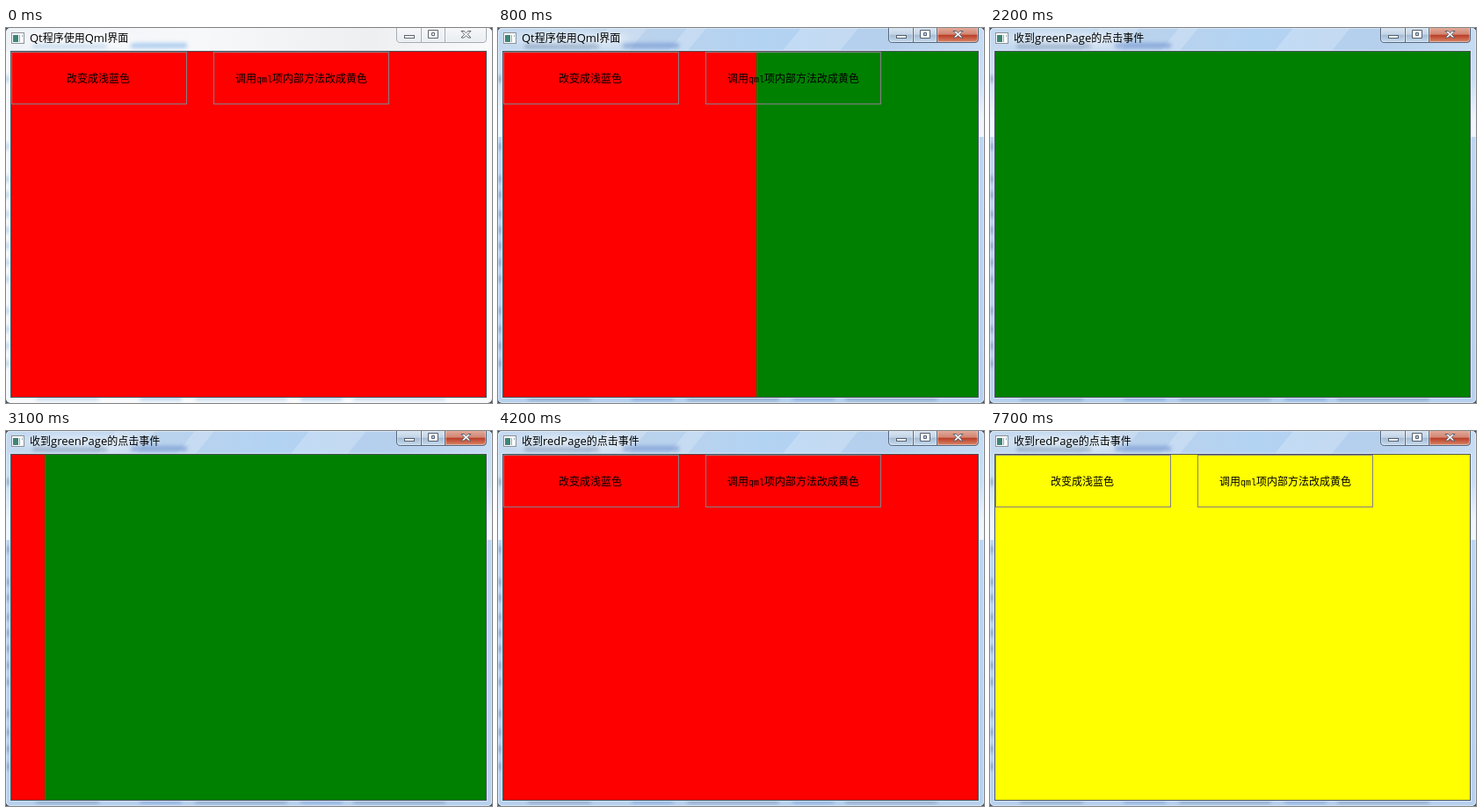
Animation, 553 px wide and 427 px high, one loop 8 s. Source, as an HTML page:

```html
<!DOCTYPE html>
<html lang="zh-CN">
<head>
<meta charset="utf-8">
<style>
html, body { margin: 0; width: 100%; height: 100%; overflow: hidden; background: #46525f; }
svg { display: block; width: 553px; height: 427px; }
text { font: 12px "Noto Sans CJK SC", "Noto Sans CJK", "Noto Sans CJK JP", sans-serif; fill: #000; white-space: pre; }
.title tspan.latin { font: 13px "Open Sans", "Noto Sans", sans-serif; }
.button tspan.latin { font: 10px "Liberation Mono", monospace; }
.button rect { fill: none; stroke: #858085; }
</style>
</head>
<body>
<svg viewBox="0 0 553 427">
  <defs>
    <filter id="soft" x="-50%" y="-200%" width="200%" height="500%"><feGaussianBlur stdDeviation="2.2"/></filter>
    <filter id="glow" x="-20%" y="-100%" width="140%" height="300%"><feGaussianBlur stdDeviation="5"/></filter>
    <clipPath id="window"><rect width="553" height="427" rx="5"/></clipPath>
    <clipPath id="client"><rect x="6" y="27" width="540" height="393"/></clipPath>
  </defs>
  <g clip-path="url(#window)">
    <g id="idle"></g>
    <g id="active"></g>
    <ellipse cx="85" cy="12" rx="66" ry="7" fill="#fff" opacity=".5" filter="url(#glow)"/>
    <g id="icon" shape-rendering="crispEdges">
      <rect x="6.5" y="5.5" width="14" height="12" fill="#fff" stroke="#8b9298"/>
      <rect x="8" y="8" width="6" height="8" fill="#3d8577"/>
      <path d="M15.5 8v8M18.5 8v2" stroke="#8fa8b4"/>
    </g>
    <text id="title" class="title" x="27" y="16"></text>
    <rect x="5.5" y="26.5" width="541" height="394" fill="none" stroke="#4b5661"/>
    <g clip-path="url(#client)">
      <rect id="page" x="6" y="27" width="540" height="393"/>
      <rect id="green" y="27" width="540" height="393" fill="#008000"/>
      <g id="buttons"></g>
    </g>
  </g>
</svg>
<script>
const $ = id => document.getElementById(id);
const LOOP = 8000, LEFT = 6, WIDTH = 540, SLIDE = 500;
const PUSH = { from: 700, start: 566.5, end: 1100 };
const POP = { from: 3100, start: 3065, end: 3600 };
const TITLES = [[0, 'Qt程序使用Qml界面'], [2200, '收到greenPage的点击事件'], [4200, '收到redPage的点击事件']];
const PAGES = [[0, '#ff0000'], [5600, '#add8e6'], [7700, '#ffff00']];

const mixed = s => s.replace(/[A-Za-z]+/g, '<tspan class="latin">$&</tspan>');
const at = (steps, t) => steps.filter(([from]) => t >= from).pop()[1];

function gradient(id, stops, vertical) {
  const list = stops.map(([o, c]) => `<stop offset="${o}" stop-color="${c}"/>`).join('');
  return `<linearGradient id="${id}" x2="${vertical ? 0 : 1}" y2="${vertical ? 1 : 0}">${list}</linearGradient>`;
}

// Blurred lines of text showing through the glass frame
function ghosts(ink, blue, alpha) {
  const row = (x, y, w, c, h = 5) => `<rect x="${x}" y="${y}" width="${w}" height="${h}" rx="2" fill="${c}"/>`;
  const side = [58, 135, 172, 190, 212, 230, 248, 267, 286, 322, 343, 362, 382]
    .map(y => row(-3, y - 4, 7, ink, 8)).join('');
  const foot = [[34, 72, ink], [152, 48, blue], [215, 105, ink], [335, 48, blue], [395, 105, ink]]
    .map(([x, w, c]) => row(x, 420, w, c, 4)).join('');
  return `<g filter="url(#soft)" opacity="${alpha}">${side}${foot}${row(30, 18, 85, ink)}${row(142, 17, 64, blue, 6)}</g>`;
}

function captions(name, edge, fill, close, glyph, glyphEdge) {
  return `<g stroke="${edge}">
    <path d="M444.5 -1V12q0 4.500 4 4.500H499.500V-1z" fill="${fill}"/>
    <path d="M499.500 -1V16.500H543q3.500 0 3.500 -4V-1z" fill="${close}"/>
    <path d="M472.500 0V16"/></g>
    <path d="M445.500 0V12q0 3.500 3.500 3.500H471.500V0M473.500 0V15.500H498.500V0M500.500 0V15.500H542q3.500 0 3.500 -3V0" fill="none" stroke="#fff" opacity=".4"/>
    <g fill="${glyph}" stroke="${glyphEdge}">
      <rect x="453.5" y="8.500" width="11" height="3"/>
      <path fill-rule="evenodd" d="M480.500 2.500h11v9h-11zM484.500 5.500v3h3v-3z"/>
      <path d="M518 3.500h3.200l2.300 2.200 2.300 -2.200h3.200l-3.700 3.700 3.700 3.800h-3.200l-2.300 -2.300 -2.300 2.300h-3.200l3.700 -3.800z"/>
    </g>`;
}

function buildChrome() {
  $('idle').innerHTML =
    gradient('idleBar', [[0, '#eef3f8'], [.4, '#f7f8fa'], [.75, '#eeeff1'], [1, '#f8f9fa']]) +
    gradient('idleBtn', [[0, '#f6f7f9'], [1, '#e9edf1']], true) +
    `<rect width="553" height="427" fill="#f7f9fb"/>
     <rect width="553" height="27" fill="url(#idleBar)"/>` +
    ghosts('#a9c8e4', '#8ab8ea', .65) +
    captions('idle', '#a2a9b1', 'url(#idleBtn)', 'url(#idleBtn)', '#fff', '#5f666d');

  $('active').innerHTML =
    gradient('bar', [[0, '#c5daf0'], [.3, '#bad2ec'], [.55, '#b3d3f3'], [.8, '#b5cfec'], [1, '#c6dcf3']]) +
    gradient('sides', [[0, '#c2daf2'], [.14, '#cbe0f4'], [.24, '#eff6fc'], [.29, '#f2f8fd'], [.291, '#bdd7f2'], [1, '#b7d1ee']], true) +
    gradient('btn', [[0, '#dbe7f3'], [.48, '#c4d4e6'], [.5, '#a5bbd3'], [1, '#c5dbef']], true) +
    gradient('close', [[0, '#e5ae9f'], [.48, '#d18470'], [.5, '#b93a25'], [1, '#d98a6b']], true) +
    `<rect width="553" height="427" fill="url(#sides)"/>
     <rect width="553" height="27" fill="url(#bar)"/>
     <g fill="#fff" opacity=".2"><path d="M125 0h45l-22 27h-45zM215 0h22l-22 27h-22zM345 0h65l-22 27h-65z"/></g>` +
    ghosts('#7189a8', '#6f92cf', .62) +
    `<rect x="4.500" y="25.500" width="543" height="396" fill="none" stroke="#e4f0fb" opacity=".7"/>
     <rect x=".5" y=".5" width="552" height="426" rx="5" fill="none" stroke="#e9f4fd" opacity=".55"/>` +
    captions('active', '#56687e', 'url(#btn)', 'url(#close)', '#fff', '#535f70');

  $('buttons').innerHTML = [[6.5, 69, '改变成浅蓝色'], [236.5, 261, '调用qml项内部方法改成黄色']]
    .map(([x, textX, label]) => `<g class="button"><rect x="${x}" y="27.5" width="199" height="59"/>
      <text x="${textX}" y="62">${mixed(label)}</text></g>`).join('');
}

// Share of the client area covered by the green page, moved every 100 ms
function cover(t) {
  const tick = Math.floor(t / 100) * 100;
  const part = move => Math.min(1, (tick - move.start) / SLIDE);
  if (t < PUSH.from) return 0;
  if (t < POP.from) return part(PUSH);
  return 1 - part(POP);
}

let shownTitle;
function draw(now) {
  const t = now % LOOP;
  const title = at(TITLES, t);
  if (title !== shownTitle) $('title').innerHTML = mixed(shownTitle = title);
  $('active').style.display = t < 500 ? 'none' : '';
  $('page').setAttribute('fill', at(PAGES, t));
  $('green').setAttribute('x', Math.round(LEFT + WIDTH * (1 - cover(t))));
  $('buttons').style.display = t >= PUSH.end && t < POP.end ? 'none' : '';
}

buildChrome();
const begin = performance.now();
function frame() {
  draw(performance.now() - begin);
  requestAnimationFrame(frame);
}
frame();
</script>
</body>
</html>
```
